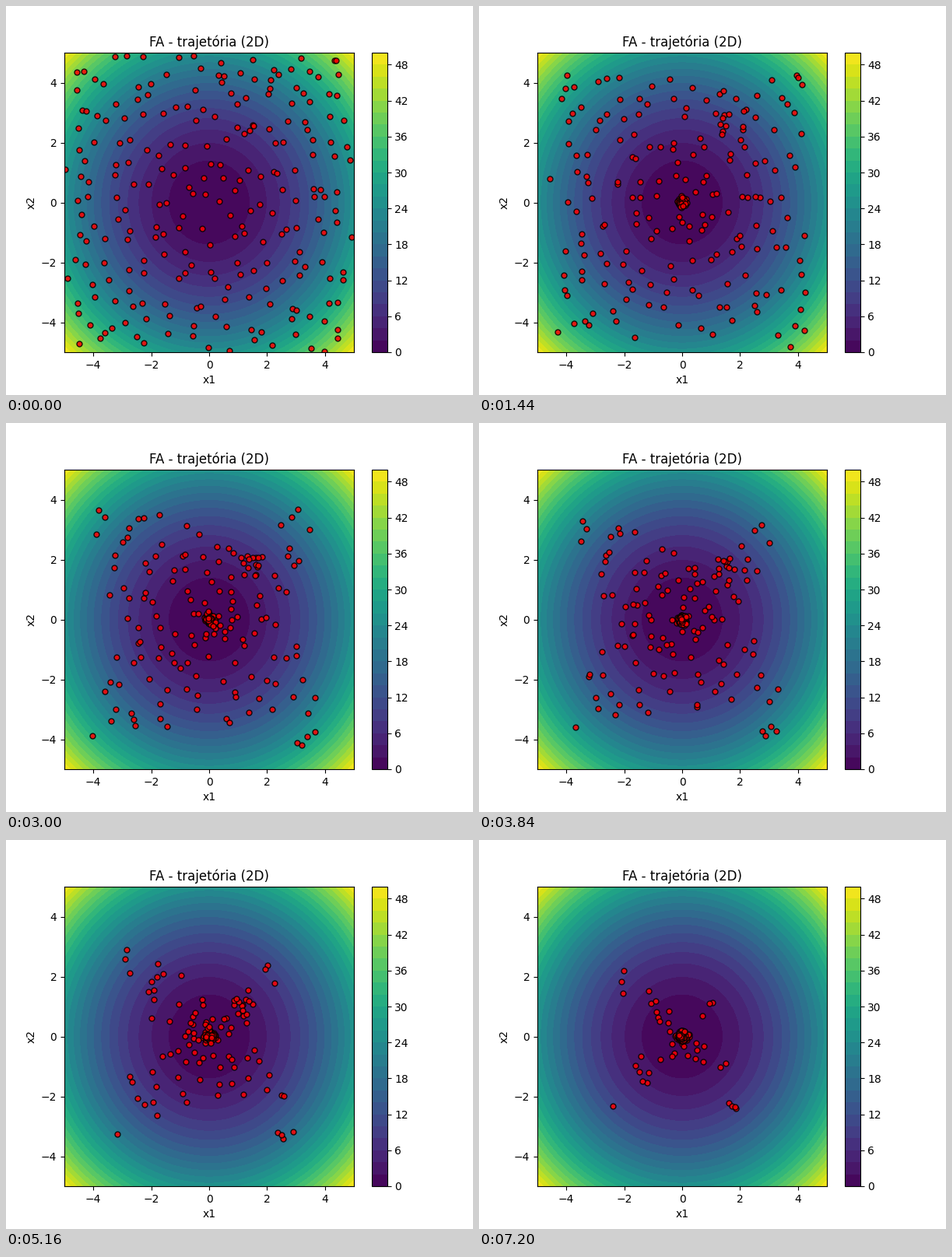
Recreate the animation shown at these times as a matplotlib script. Size 600 by 500 pixels, loop 7.32 s.

```python
import numpy as np
import matplotlib.pyplot as plt
from matplotlib.animation import FuncAnimation

FRAMES, INTERVAL = 61, 120
LIMIT = 5
SIDE = 15       # fireflies start scattered over SIDE x SIDE cells
SWARM = 11      # size of the group at the upper right
rng = np.random.default_rng(42)
now = np.arange(FRAMES)
t = now[:, None, None]


def walk(n, step):
    """Random drift that starts at zero."""
    w = rng.normal(0, step, (FRAMES, n, 2)).cumsum(axis=0)
    return w - w[0]


def scatter_start():
    """One random point in every cell of the search area."""
    cell = 2 * LIMIT / SIDE
    corners = np.stack(np.meshgrid(*[np.arange(SIDE)] * 2), axis=-1).reshape(-1, 2)
    return (corners + rng.uniform(0, 1, corners.shape)) * cell - LIMIT


def travel_time(p):
    """Frames needed to reach the centre; the upper right is the fastest way in."""
    r, angle = np.hypot(*p.T), np.arctan2(p[:, 1], p[:, 0])
    pace = 1.03 - 0.3 * np.maximum(np.cos(angle - np.pi / 4), 0) ** 2
    return np.maximum(1.9 * pace * r ** 2.15, 1)[:, None]


def fly_in(start):
    n = len(start)
    left = 1 - np.minimum(t / travel_time(start), 1) ** 1.2
    jitter = rng.normal(0, 0.075, (FRAMES, n, 2)) * (1 - left)
    return (start + walk(n, 0.065)) * left + jitter


def fly_as_swarm(n):
    """Gather around a moving hub, then sink to the centre with it."""
    times = [0, 12, 19, 32, 43, 51, 58]
    hub = np.stack([np.interp(now, times, [1.7, 1.5, 1.5, 1.4, 0.95, 0.3, 0]),
                    np.interp(now, times, [2.6, 2.35, 1.85, 1.7, 0.95, 0.6, 0])], axis=1)
    size = np.interp(now, times, [1, 0.35, 0.15, 0.18, 0.2, 0.15, 0])[:, None, None]
    offset = rng.uniform(-1.9, 1.9, (n, 2))
    jitter = rng.normal(0, 0.06, (FRAMES, n, 2))
    return hub[:, None] + size * (offset + walk(n, 0.08)) + jitter


tracks = np.concatenate([fly_in(scatter_start()), fly_as_swarm(SWARM)], axis=1)

fig, ax = plt.subplots(figsize=(6, 5), dpi=100)
grid = np.linspace(-LIMIT, LIMIT, 200)
X, Y = np.meshgrid(grid, grid)
bowl = ax.contourf(X, Y, X ** 2 + Y ** 2, levels=np.arange(0, 51, 2), cmap="viridis")
fig.colorbar(bowl, ax=ax)
dots = ax.scatter(*tracks[0].T, s=25, c="red", edgecolors="black",
                  linewidths=1, alpha=0.85, zorder=2)
ax.set(xlim=(-LIMIT, LIMIT), ylim=(-LIMIT, LIMIT), xlabel="x1", ylabel="x2",
       title="FA - trajetória (2D)")


def update(i):
    dots.set_offsets(tracks[i])
    return (dots,)


anim = FuncAnimation(fig, update, frames=FRAMES, interval=INTERVAL,
                     repeat=True, repeat_delay=0)
plt.show()
```
